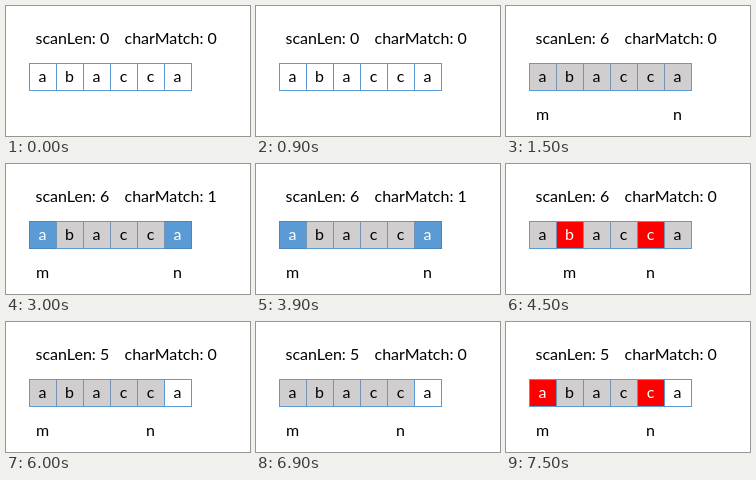
These frames come from a looping animation (244x130 px, 8000 ms). An HTML page:

```html
<!DOCTYPE html>
<html lang="en">
<head>
<meta charset="utf-8">
<title>Palindrome scan</title>
<style>
  html, body { margin: 0; width: 100%; height: 100%; overflow: hidden; background: #fff; }
  svg { display: block; width: 244px; height: 130px; font: 16px Lato, Carlito, sans-serif; fill: #000; }
  .mid { text-anchor: middle; }
  .cell { fill: #fff; stroke: #5b9bd5; }
  .cell.scan { fill: #d0cece; }
  .cell.match { fill: #5b9bd5; stroke: #4a86bd; }
  .cell.miss { fill: #f00; }
  .match + text, .miss + text { fill: #fff; }
  .divider { stroke: #7593b0; }
</style>
</head>
<body>
<svg viewBox="0 0 244 130">
  <text id="scan" x="29.5" y="38"></text>
  <text id="count" x="118.5" y="38"></text>
  <g id="row" class="mid"></g>
  <g id="dividers"></g>
  <g class="mid">
    <text id="m" y="114">m</text>
    <text id="n" y="114">n</text>
  </g>
</svg>
<script>
const WORD = "abacca", LEFT = 23.5, TOP = 57.5, SIZE = 27;
const STEP = 1500, LOOP = 8000;

// Scan window length, matches so far, pointer positions and comparison result.
const steps = [
  { len: 0, count: 0 },
  { len: 6, count: 0, m: 0, n: 5 },
  { len: 6, count: 1, m: 0, n: 5, result: "match" },
  { len: 6, count: 0, m: 1, n: 4, result: "miss" },
  { len: 5, count: 0, m: 0, n: 4 },
  { len: 5, count: 0, m: 0, n: 4, result: "miss" }
];

const byId = id => document.getElementById(id);
const edge = i => LEFT + i * SIZE;
const center = i => edge(i) + SIZE / 2 - .5;

function add(parent, name, attrs, text = "") {
  const node = document.createElementNS("http://www.w3.org/2000/svg", name);
  for (const key in attrs) node.setAttribute(key, attrs[key]);
  node.textContent = text;
  return parent.appendChild(node);
}

const cells = [...WORD].map((letter, i) => {
  const rect = add(byId("row"), "rect", { x: edge(i), y: TOP, width: SIZE, height: SIZE });
  add(byId("row"), "text", { x: center(i), y: 76 }, letter);
  return rect;
});
const dividers = cells.slice(1).map((_, i) =>
  add(byId("dividers"), "path", { class: "divider", d: `M${edge(i + 1)} ${TOP + .5}v${SIZE - 1}` }));

function placePointer(id, index) {
  const hidden = index === undefined;
  byId(id).style.display = hidden ? "none" : "";
  if (!hidden) byId(id).setAttribute("x", center(index));
}

function show(step) {
  byId("scan").textContent = `scanLen: ${step.len}`;
  byId("count").textContent = `charMatch: ${step.count}`;
  cells.forEach((cell, i) => {
    const compared = step.result && (i === step.m || i === step.n);
    const state = compared ? step.result : i < step.len ? "scan" : "";
    cell.setAttribute("class", `cell ${state}`);
  });
  dividers.forEach((line, i) => line.style.display = i + 1 < step.len ? "" : "none");
  placePointer("m", step.m);
  placePointer("n", step.n);
}

let shown;
function tick() {
  const index = Math.floor(performance.now() % LOOP / STEP);
  if (index !== shown) show(steps[shown = index]);
  requestAnimationFrame(tick);
}
tick();
</script>
</body>
</html>
```
